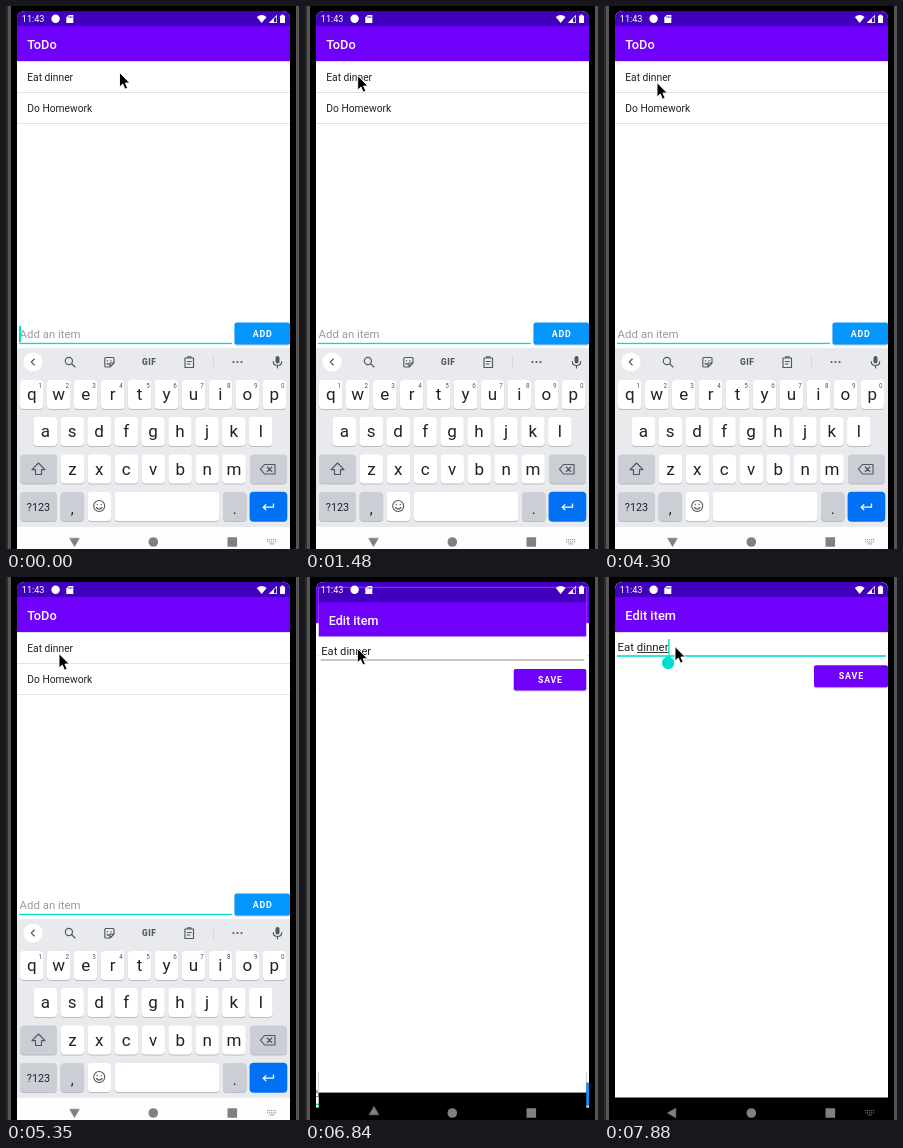
An HTML page that plays this animation: 293x543 px, repeating every 8000 ms.

```html
<!DOCTYPE html>
<html lang="en">
<head>
<meta charset="utf-8">
<title>ToDo</title>
<style>
html, body { margin: 0; width: 100%; height: 100%; overflow: hidden; background: #000; }
svg { display: block; width: 100vw; height: 100vh; font-family: Roboto, "Noto Sans", sans-serif; }
.line { fill: none; stroke: #54585d; stroke-width: 1.15; stroke-linecap: round; stroke-linejoin: round; }
.mid { text-anchor: middle; }
</style>
</head>
<body>
<svg id="stage" viewBox="0 0 293 543"></svg>
<script>
const PURPLE = '#6f00fc', DARK = '#4000bd', TEAL = '#00dfcc', BLUE = '#0496ff', GREY = '#808080';
const INK = '#202124', ICON = '#54585d';

const rect = (x, y, w, h, fill, r = 0, more = '') =>
  `<rect x="${x}" y="${y}" width="${w}" height="${h}" fill="${fill}" rx="${r}" ${more}/>`;
const text = (x, y, size, str, fill = INK, more = '') =>
  `<text x="${x}" y="${y}" font-size="${size}" fill="${fill}" ${more}>${str}</text>`;
const circle = (x, y, r, fill) => `<circle cx="${x}" cy="${y}" r="${r}" fill="${fill}"/>`;
const path = (d, fill, more = '') => `<path d="${d}" fill="${fill}" ${more}/>`;
const line = d => `<path d="${d}" class="line"/>`;
const group = (id, body) => `<g id="${id}">${body}</g>`;

const page = title =>
  rect(11, 500, 273, 50, '#000') + rect(11, 5, 273, 515.5, '#fff') +
  rect(11, 5, 273, 16, DARK) + rect(11, 20, 273, 35, PURPLE) + rect(11, 55, 273, 1, '#0002') +
  text(21.3, 43, 12.8, title, '#fff', 'font-weight="500"');

const button = (x, y, w, label, fill) =>
  rect(x, y + 1, w, 22, '#0003', 2) + rect(x, y, w, 22, fill, 2) +
  text(x + w / 2 + .4, y + 14.2, 8.9, label, '#fff', 'class="mid" font-weight="700" letter-spacing=".8"');

function listPage() {
  return page('ToDo') +
    text(21.3, 75, 10.25, 'Eat dinner') + rect(11, 86, 273, 1, '#e2e2e2') +
    text(21.3, 106, 10.25, 'Do Homework') + rect(11, 117, 273, 1, '#e2e2e2') +
    group('entry',
      text(13.6, 332.3, 11.4, 'Add an item', '#9a9a9a') +
      rect(13, 336.8, 213, 1.3, TEAL) +
      rect(13, 320, 2, 16, TEAL, 0, 'id="caret"') +
      button(228.5, 316.4, 55.5, 'ADD', BLUE));
}

function editPage() {
  return page('Edit item') +
    text(13.6, 74, 11.4, 'Eat dinner') +
    rect(13, 78.6, 269, 1, '#8c8c8c', 0, 'id="rule"') +
    button(210, 88.2, 74, 'SAVE', PURPLE) +
    group('focus',
      rect(13, 78.2, 269, 1.6, TEAL) + rect(33, 75, 31, .9, INK) +
      rect(64.2, 62, 1.4, 16, TEAL) +
      path('M64.5 78.6 L60 82 H69Z', TEAL) + circle(64.2, 86, 6.2, TEAL));
}

function key(x, y, w, label = '', fill = '#fff', size = 17, base = 20) {
  return rect(x, y + 1, w, 29, '#b9bcc2', 4) + rect(x, y, w, 29, fill, 4) +
    text(x + w / 2, y + base, size, label, INK, 'class="mid"');
}

function keyboard() {
  const soft = '#cbced4', pitch = 26.95;
  let out = rect(11, 342, 273, 180, '#e8eaed') + rect(11, 521, 273, 22, '#fdfdfd');
  // suggestion strip
  out += circle(27, 356, 9.6, '#fff') + line('M28.3 353 L25.3 356 L28.3 359') +
    line('M66 358 L69 361 M66.5 355 A3.6 3.6 0 1 1 59.3 355 A3.6 3.6 0 1 1 66.5 355') +
    line('M100 351.5 H107 Q108 351.5 108 352.5 V357 L104 361 H100 Q98.8 361 98.8 360 V352.5 Q98.8 351.5 100 351.5 M108 357 H104 V361 M101.5 354.5 V355 M105 354.5 V355 M101 357.5 Q102 358.5 103 358') +
    text(143.2, 359.1, 8.3, 'GIF', ICON, 'class="mid" font-weight="900" letter-spacing=".5"') +
    line('M179 352 H187.5 V361.5 H179Z M181.5 352 V350.7 H185 V352 M181.3 355.5 H185.3 M181.3 358 H184') +
    rect(207, 349, .8, 14, '#cfd2d6') +
    [227.5, 231.5, 235.5].map(x => circle(x, 356, 1.1, ICON)).join('') +
    rect(269.5, 350, 4, 7.5, ICON, 2) + line('M267.3 355.5 Q267.3 359.5 271.5 359.5 Q275.7 359.5 275.7 355.5 M271.5 359.5 V362');
  // letters
  [...'qwertyuiop'].forEach((c, i) => {
    const x = 14 + i * pitch;
    out += key(x, 374, 23.5, c) + text(x + 20.2, 382, 6.3, (i + 1) % 10, '#55585d', 'class="mid"');
  });
  [...'asdfghjkl'].forEach((c, i) => out += key(27.5 + i * pitch, 411, 23.5, c));
  [...'zxcvbnm'].forEach((c, i) => out += key(54.6 + i * pitch, 448.5, 23.5, c));
  out += key(14, 448.5, 37, '', soft) + line('M32.5 457 L39 463.6 H35.5 V468.5 H29.5 V463.6 H26Z') +
    key(244, 448.5, 37, '', soft) +
    line('M258.5 458.5 H269 V468 H258.5 L254.5 463.2Z M261.3 461 L265.8 465.5 M265.8 461 L261.3 465.5');
  // bottom row
  out += key(14, 486, 37, '?123', soft, 10.8, 18.5) +
    key(54.6, 486, 23.5, ',', soft, 15, 22) + key(81.5, 486, 23.5) +
    line('M98.7 500 A5.5 5.5 0 1 1 87.7 500 A5.5 5.5 0 1 1 98.7 500 M91.2 498.3 V498.7 M95.2 498.3 V498.7 M90.4 501.5 Q93.2 504.6 96 501.5') +
    key(108.5, 486, 105) + key(217, 486, 23.5, '.', soft, 15, 22) +
    rect(243.6, 485.7, 37.7, 30, '#0070f5', 4) +
    path('M267.5 497.5 V501.2 H257.5 M260.2 498.4 L257.3 501.2 L260.2 504', 'none', 'stroke="#fff" stroke-width="1.3"');
  return out;
}

function statusIcons() {
  return text(15.8, 16.2, 9.1, '11:43', '#fff') + circle(49.6, 12.8, 4.2, '#fff') +
    path('M62.7 9 H67.3 V17 H60.3 V11.5Z', '#fff') +
    path('M62.9 10.2 V12 M64.4 10.2 V12 M65.9 10.2 V12', 'none', `stroke="${DARK}" stroke-width=".7"`) +
    path('M250.8 11 Q255.7 7 260.6 11 L255.7 17Z', '#fff') +
    path('M271 8.7 V17 H262.7Z', '#fff') + path('M268 12.8 L270.3 10.5 V16.3 H268Z', DARK) +
    rect(274, 9.6, 5, 7.4, '#fff', .7) + rect(275.3, 8.6, 2.4, 1.5, '#fff');
}

function navIcons() {
  const dots = [0, 1, 2, 3, 4].map(i =>
    rect(261 + i * 2, 533, 1.2, 1.2, GREY) + rect(261 + i * 2, 535.2, 1.2, 1.2, GREY)).join('');
  return path('M-4.6 0 L3.8 -4.8 V4.8Z', GREY, `id="back" stroke="${GREY}" stroke-width=".6" stroke-linejoin="round"`) +
    circle(147.3, 536, 4.8, GREY) + rect(221.5, 531.2, 9.6, 9.6, GREY, .6) +
    `<g opacity=".75">${group('switcher', dots + rect(263.5, 537.4, 4.8, 1, GREY))}</g>`;
}

document.getElementById('stage').innerHTML =
  '<clipPath id="glass"><path d="M11 543 V13 Q11 5 19 5 H276 Q284 5 284 13 V543Z"/></clipPath>' +
  rect(0, 0, 293, 543, '#000') + rect(0, 0, 2, 543, '#2c2c2c') + rect(2, 0, 3, 543, '#555') +
  rect(290, 0, 3, 543, '#555') +
  `<g clip-path="url(#glass)">${group('list', listPage())}${group('edit', editPage())}` +
  `${group('keys', keyboard())}${statusIcons()}${navIcons()}</g>` +
  path('M0 0 V14.6 L3.3 11.5 L5.5 16.7 L8.1 15.6 L5.9 10.5 H10.3Z', '#000', 'id="mouse" stroke="#fff" stroke-width=".9"');

const LOOP = 8000, OPEN = 6840, FOCUS = 7880;
const blinks = [300, 750, 1330, 1770, 2370, 2810, 3410, 3860, 4300, 4900, 5350, 5790, 6390];
// pointer: time, x, y
const moves = [
  [0, 113.5, 66.5], [750, 109, 66.5], [900, 97, 67], [1050, 82, 67.5], [1190, 67, 68.5], [1330, 57, 69],
  [1480, 52.7, 69.5], [1630, 53, 73], [1770, 56, 77.5], [2070, 60, 79], [2220, 62, 80], [2370, 59, 79],
  [2520, 55, 78], [2670, 53, 76.5], [4900, 53.5, 77.5], [5050, 53, 76.5], [5790, 53, 74],
  [5940, 52.5, 72], [6090, 52.3, 71.3], [7430, 60, 72], [7580, 71, 69.5]
];

const el = id => document.getElementById(id);
const show = (id, on) => el(id).setAttribute('visibility', on ? 'visible' : 'hidden');
const place = (id, value) => el(id).setAttribute('transform', value);
const zoom = k => `translate(147.5 275) scale(${k}) translate(-147.5 -275)`;

function draw(t) {
  const open = t >= OPEN, focus = t >= FOCUS;
  const step = !open ? 0 : t < 6990 ? 1 : t < 7130 ? 2 : 3;
  const [, x, y] = moves.filter(m => m[0] <= t).pop();
  place('mouse', `translate(${x} ${y})`);
  show('caret', blinks.filter(b => b <= t).length % 2 === 0);
  show('keys', !open);
  show('edit', open);
  show('rule', open && !focus);
  show('focus', focus);
  show('switcher', !open || focus);
  place('list', zoom([1, 1.041, 1.05, 1.05][step]));
  place('entry', `translate(0 ${open ? 180 : 0})`);
  place('edit', zoom([1, .98, .996, 1][step]));
  place('back', ['translate(68.5 536) rotate(-90)', 'translate(69 534) rotate(90)',
    'translate(68 536)', 'translate(68 536)'][step]);
}

function tick() {
  draw(performance.now() % LOOP);
  requestAnimationFrame(tick);
}
tick();
</script>
</body>
</html>
```
